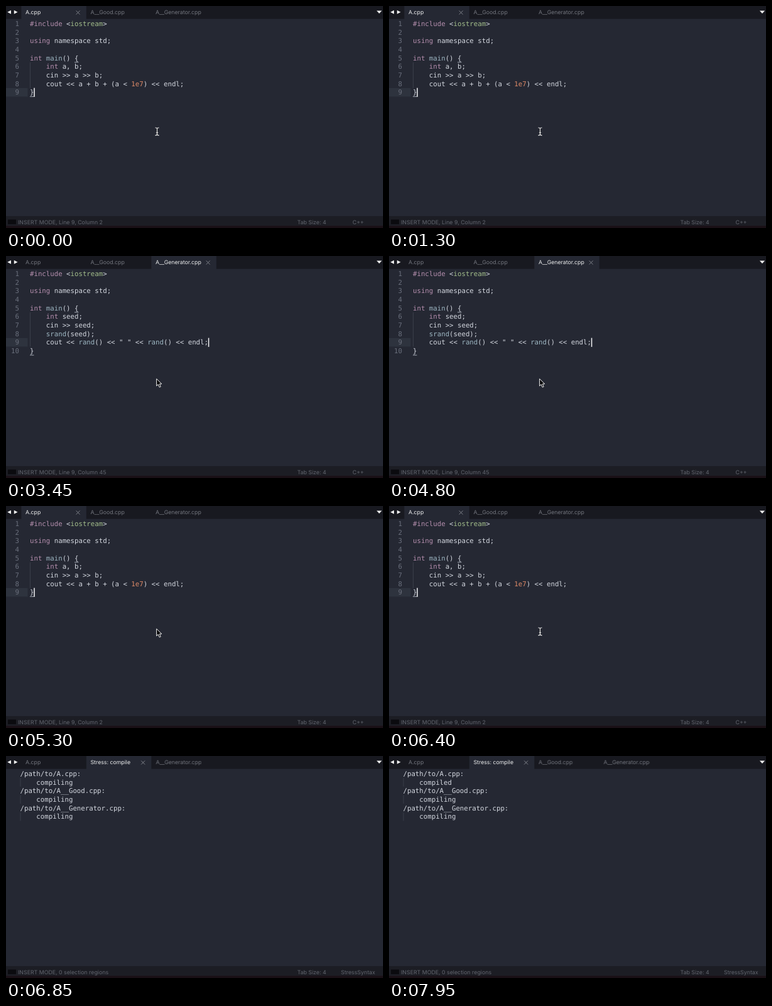
Animation, 600 px wide and 354 px high, one loop 8 s. Source, as an HTML page:

```html
<!DOCTYPE html>
<html lang="en">
<head>
<meta charset="utf-8">
<title>Editor tabs</title>
<style>
html, body { margin: 0; width: 100%; height: 100%; overflow: hidden; background: #252833; }
svg { display: block; width: 100%; height: 100%; }
text { text-rendering: geometricPrecision; white-space: pre; }
.code { font: 10.72px "DejaVu Sans Mono", monospace; fill: #d3d7df; }
.key { fill: #b48ead; }
.str { fill: #a3be8c; }
.num { fill: #de8a68; }
.fn { fill: #9db6c2; }
.line { fill: #6a6f7c; }
.ui { font: 8.75px Inter, "Open Sans", sans-serif; fill: #72757d; }
.ui.on { fill: #eceded; }
.ui.status { font-size: 8.8px; fill: #62656e; }
.guide { stroke: #3a3e4a; }
.match { stroke: #a4a9b4; }
.close { stroke: #80838b; fill: none; }

.scene, .step { animation: 8s step-end infinite; }
.caret { fill: #f4f5f7; animation: 8s ease-in-out infinite; }
#main { animation-name: main; }
#good { animation-name: good; }
#gen { animation-name: gen; }
#stress { animation-name: stress; }
#main .caret { animation-name: main-caret; }
#good .caret { animation-name: good-caret; }
#gen .caret { animation-name: gen-caret; }
#beam { animation-name: beam; }
#arrow { animation-name: arrow; }
.before { animation-name: before; }
.after { animation-name: after; }
.slide { animation: slide 8s ease-in-out infinite; }

@keyframes main { 0%, 65.625% { opacity: 1 } 19.375%, 85.625%, 100% { opacity: 0 } }
@keyframes good { 0%, 43.125%, 100% { opacity: 0 } 19.375% { opacity: 1 } }
@keyframes gen { 0%, 65.625%, 100% { opacity: 0 } 43.125% { opacity: 1 } }
@keyframes stress { 0% { opacity: 0 } 85.625%, 100% { opacity: 1 } }
@keyframes beam { 0%, 69.375% { opacity: 1 } 19.375%, 85.625%, 100% { opacity: 0 } }
@keyframes arrow { 0%, 69.375%, 100% { opacity: 0 } 19.375% { opacity: 1 } }
@keyframes before { 0% { opacity: 1 } 93.125%, 100% { opacity: 0 } }
@keyframes after { 0% { opacity: 0 } 93.125%, 100% { opacity: 1 } }
@keyframes main-caret {
  0%, .625%, 15.625%, 68.75%, 79.375%, 81.25% { opacity: 1 }
  5%, 10.625%, 72.5%, 74.375%, 85%, 100% { opacity: 0 }
}
@keyframes good-caret {
  0%, 21.25%, 37.5%, 100% { opacity: 1 }
  26.25%, 31.875% { opacity: 0 }
}
@keyframes gen-caret {
  0%, 46.25%, 59.375%, 100% { opacity: 1 }
  51.25%, 55% { opacity: 0 }
}
@keyframes slide {
  0%, 85.375% { transform: translateX(0) }
  90.625%, 100% { transform: translateX(103.5px) }
}
</style>
</head>
<body>
<svg id="stage" viewBox="0 0 600 354" preserveAspectRatio="none"></svg>
<script>
const CHAR = 6.454, ROW = 13.68, TOP = 21.4, LEFT = 38, TAB = 103.5;
const names = ['A.cpp', 'A__Good.cpp', 'A__Generator.cpp'];
const token = /(#include|using|\bint\b)|(iostream)|(1e7)|(main|s?rand\b)|[^\s\w]+|\w+/g;
const kinds = ['key', 'str', 'num', 'fn'];

const esc = s => s.replace(/&/g, '&amp;').replace(/</g, '&lt;').replace(/>/g, '&gt;');
const text = (x, y, s, cls) => `<text x="${x}" y="${y}" class="${cls}">${esc(s)}</text>`;
const rect = (x, y, w, h, fill, cls = '') =>
  `<rect x="${x}" y="${y}" width="${w}" height="${h}" fill="${fill}" class="${cls}"/>`;
const path = (d, cls) => `<path d="${d}" class="${cls}"/>`;
const rowTop = i => TOP + i * ROW;
const baseline = i => rowTop(i) + 10.5;

function codeLine(s, row, left = LEFT) {
  return [...s.matchAll(token)].map(m => {
    const kind = kinds[m.slice(1).findIndex(Boolean)] || '';
    return text(left + m.index * CHAR, baseline(row), m[0], 'code ' + kind);
  }).join('');
}

const label = (s, i, on) => text(31 + i * TAB, 13, s, on ? 'ui on' : 'ui');

function activeTab(s, i) {
  const x = 24.3 + i * TAB, c = x + 90.3;
  return rect(x, 0, TAB, 21, '#252833') + label(s, i, true) +
    path(`M${c - 3} 7.5l6 6m0 -6l-6 6`, 'close');
}

const status = (left, syntax, x) =>
  text(19, 347.5, left, 'ui status') + text(463.5, 347.5, 'Tab Size: 4', 'ui status') +
  text(x, 347.5, syntax, 'ui status');

function editor(id, tab, body, row, col) {
  const lines = ['#include <iostream>', '', 'using namespace std;', '', 'int main() {',
    ...body.map(s => '    ' + s), '}'];
  const last = lines.length - 1;
  const brace = (r, c) => path(`M${LEFT + c * CHAR} ${rowTop(r) + 13.6}h${CHAR}`, 'match');
  return `<g id="${id}" class="scene">` +
    names.map((s, i) => i === tab ? '' : label(s, i)).join('') + activeTab(names[tab], tab) +
    rect(0, rowTop(row), 34.5, ROW, '#2e333e') +
    lines.map((s, i) => {
      const n = String(i + 1);
      return text(21 - n.length * CHAR, baseline(i), n, 'code line') + codeLine(s, i);
    }).join('') +
    path(`M38.5 ${rowTop(5)}V${rowTop(last)}`, 'guide') + brace(4, 11) + brace(last, 0) +
    rect(LEFT + col * CHAR - .2, rowTop(row) - .2, 1.5, ROW + .6, '#fff', 'caret') +
    status(`INSERT MODE, Line ${row + 1}, Column ${col + 1}`, 'C++', 551.5) + '</g>';
}

function stress() {
  const left = 22.5;
  const files = names.map((s, i) => {
    const row = 2 * i + 1, work = codeLine('    compiling', row, left);
    const state = i ? work : `<g class="step before">${work}</g>` +
      `<g class="step after">${codeLine('    compiled', row, left)}</g>`;
    return codeLine(`/path/to/${s}:`, 2 * i, left) + state +
      path(`M23 ${rowTop(row)}v${ROW}`, 'guide');
  }).join('');
  return '<g id="stress" class="scene">' + label(names[0], 0) +
    `<g class="slide">${label(names[1], 1)}${label(names[2], 2)}</g>` +
    activeTab('Stress: compile', 1) + files +
    status('INSERT MODE, 0 selection regions', 'StressSyntax', 533) + '</g>';
}

const chrome = rect(0, 0, 600, 354, '#252833') + rect(0, 0, 600, 20.6, '#181920') +
  rect(0, 335, 600, 16, '#1c1d24') + rect(0, 350.5, 600, 3.5, '#1a1016') +
  rect(3, 340.5, 13, 7.5, '#0b0b0f') +
  '<path fill="#eee" d="M8 6.8v6L2.2 9.8zM12.8 6.8v6l5.8-3zM589.8 7.6h8.4l-4.2 4.4z"/>';

const pointers =
  '<g id="beam" class="step" fill="none"><path stroke="#15161b" stroke-width="2.6" d="M240.5 194.5v11.5"/>' +
  '<path stroke="#f0f0f0" stroke-width="1.2" d="M237.5 194q2.5 0 3 1.2q.5 -1.2 3 -1.2M237.5 206.3q2.5 0 3 -1.2q.5 1.2 3 1.2M240.5 195v10.5M238.8 202h3.4"/></g>' +
  '<path id="arrow" class="step" fill="#08080a" stroke="#f2f2f2" d="M239.6 195.8v11.4l2.6 -2.5l1.9 4.6l2.1 -.9l-1.9 -4.4h3.5z"/>';

document.getElementById('stage').innerHTML = chrome +
  editor('main', 0, ['int a, b;', 'cin >> a >> b;', 'cout << a + b + (a < 1e7) << endl;'], 8, 1) +
  editor('good', 1, ['int a, b;', 'cin >> a >> b;', 'cout << a + b << endl;'], 7, 17) +
  editor('gen', 2, ['int seed;', 'cin >> seed;', 'srand(seed);',
    'cout << rand() << " " << rand() << endl;'], 8, 44) +
  stress() + pointers;
</script>
</body>
</html>
```
